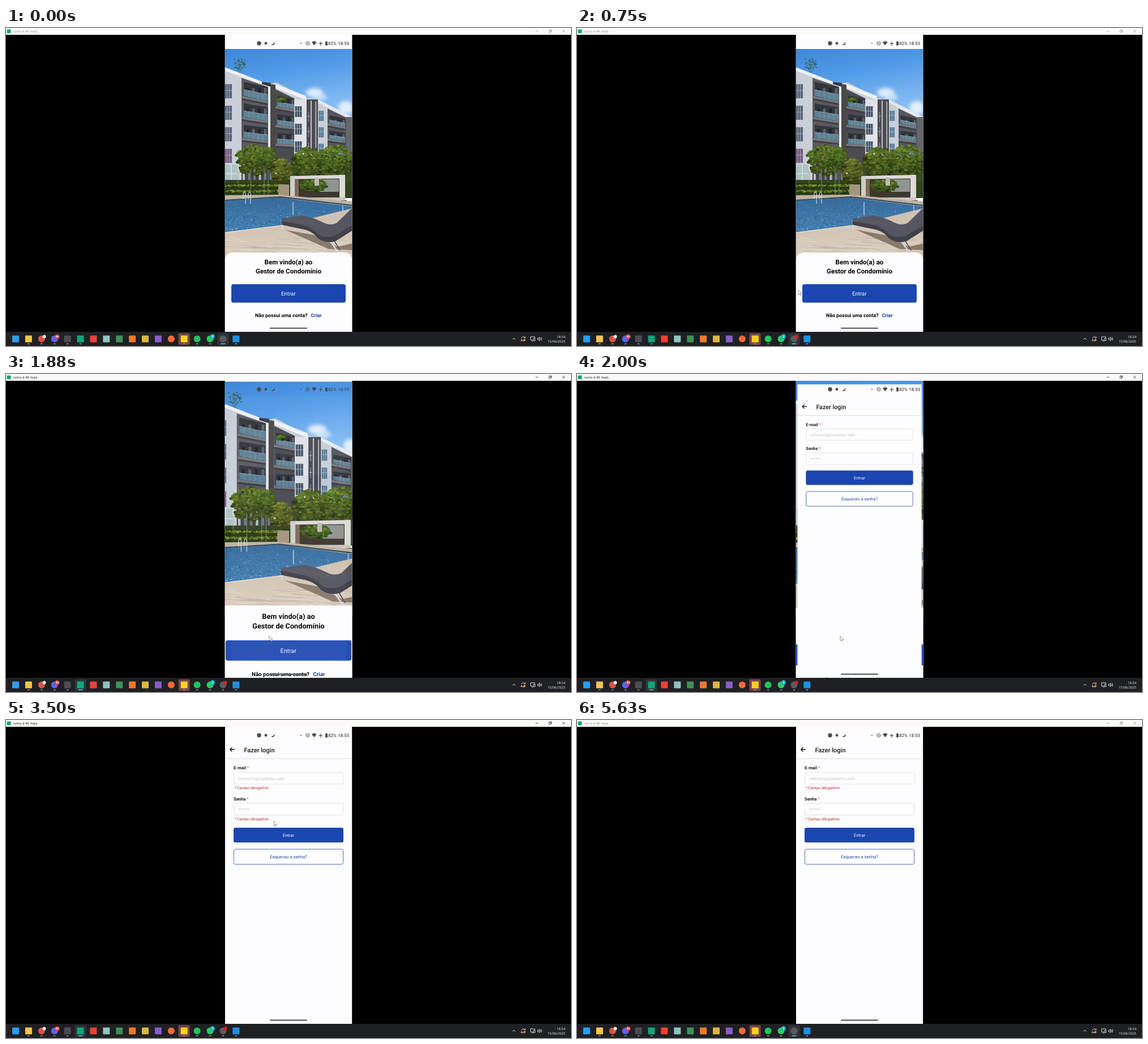
Recreate the animation shown at these times as an HTML page. Size 998 by 561 pixels, loop 5.76 s.

```html
<!DOCTYPE html>
<html lang="pt-BR">
<head>
<meta charset="utf-8">
<title>Gestor de Condomínio</title>
<style>
  html, body { margin: 0; width: 100%; height: 100%; overflow: hidden; background: #000; }
  svg { display: block; width: 998px; height: 561px; }
  text { font-family: Roboto, sans-serif; text-rendering: geometricPrecision; white-space: pre; }
  .mid { text-anchor: middle; }
  .b { font-weight: 700; }
  .m { font-weight: 500; }
  .sys { font-family: "Open Sans", sans-serif; }
  .field { fill: #fdfdff; stroke: #dcdce6; stroke-width: .8; }
  .hint { font-size: 7.65px; fill: #c9c9cf; }
  .err { font-size: 6.67px; fill: #b3261e; }
  .label { font-size: 7.6px; font-weight: 700; fill: #1c1c22; }
  .label tspan { fill: #d8434a; font-weight: 400; }
</style>
</head>
<body>
<svg viewBox="0 0 998 561">
  <defs>
    <clipPath id="screen"><rect x="386.7" y="12" width="224.7" height="524"/></clipPath>
    <clipPath id="photoBox"><rect x="386.7" y="37" width="224.7" height="374"/></clipPath>
    <linearGradient id="sky" x1="0" y1="0" x2=".15" y2="1">
      <stop offset="0" stop-color="#3f86d8"/><stop offset=".22" stop-color="#529be8"/><stop offset=".5" stop-color="#86bdf3"/>
    </linearGradient>
    <linearGradient id="water" x1="0" y1="0" x2="0" y2="1">
      <stop offset="0" stop-color="#376a9b"/><stop offset="1" stop-color="#4585b8"/>
    </linearGradient>
    <linearGradient id="deck" x1="0" y1="0" x2="0" y2="1">
      <stop offset="0" stop-color="#cdbfb0"/><stop offset="1" stop-color="#dccfbf"/>
    </linearGradient>
    <filter id="soft" x="-60%" y="-60%" width="220%" height="220%"><feGaussianBlur stdDeviation="3"/></filter>
  </defs>
  <rect width="998" height="561"/>

  <g clip-path="url(#screen)">
    <g id="welcome">
      <rect x="386" y="12" width="226" height="524" fill="#fdfdff"/>
      <g id="photo" clip-path="url(#photoBox)"></g>
      <path d="M386.700 536V410a14 14 0 0 1 14-14H597.400a14 14 0 0 1 14 14V536Z" fill="#fdfdff"/>
      <text class="mid b" x="499" y="417.4" font-size="11.55">Bem vindo(a) ao</text>
      <text class="mid b" x="499" y="433" font-size="11.55">Gestor de Condomínio</text>
      <g id="enter">
        <rect x="398" y="452" width="202" height="32.6" rx="3.5" fill="#1b46b0"/>
        <text class="mid" x="498.8" y="471.8" font-size="9.75" fill="#f4f6ff">Entrar</text>
      </g>
      <text class="b" x="440" y="509.7" font-size="8.8">Não possui uma conta?</text>
      <text class="b" x="538.5" y="509.7" font-size="8.8" fill="#1f3f9e">Criar</text>
    </g>

    <g id="login">
      <rect x="386.7" y="12" width="224.7" height="524" fill="#fdfdff"/>
      <path d="M404 52H395.6M399.4 48.2L395.6 52L399.4 55.8" fill="none" stroke="#111" stroke-width="1.3"/>
      <text class="m" x="420.5" y="56.6" font-size="11" fill="#16161a">Fazer login</text>
      <rect x="386" y="67.6" width="226" height="1" fill="#d9d9de"/>
      <text class="label" x="402" y="87.2">E-mail <tspan>*</tspan></text>
      <rect class="field" x="402.4" y="92.4" width="193.4" height="20.6" rx="2.5"/>
      <text class="hint" x="410" y="105.5">memoria@caderno.web</text>
      <text class="err error" x="404" y="122.3">* Campo obrigatório</text>
      <g id="pass">
        <text class="label" x="402" y="130.9">Senha <tspan>*</tspan></text>
        <rect class="field" x="402.4" y="136" width="193.4" height="20.6" rx="2.5"/>
        <text class="hint" x="410" y="149.8">******</text>
        <text class="err error" x="404" y="166.2">* Campo obrigatório</text>
      </g>
      <g id="actions">
        <g id="submit">
          <rect x="402" y="167.8" width="194" height="26" rx="3.2" fill="#1b46b0"/>
          <text class="mid" x="499" y="183.8" font-size="7.65" fill="#f4f6ff">Entrar</text>
        </g>
        <rect x="402.4" y="205.6" width="193.2" height="26.6" rx="3.2" fill="#fdfdff" stroke="#3b5eb5" stroke-width=".9"/>
        <text class="mid" x="499" y="221.6" font-size="7.7" fill="#2349a8">Esqueceu a senha?</text>
      </g>
    </g>

    <g fill="#4c4c52">
      <circle cx="447" cy="27" r="3.7"/>
      <circle cx="459" cy="27" r="2.4"/>
      <path d="M473.8 24.4A3.4 3.4 0 1 1 468.4 28.7A4.6 4.6 0 0 0 473.8 24.4Z"/>
      <circle cx="521" cy="27" r="1"/>
      <circle cx="533" cy="27" r="3.2" fill="none" stroke="#4c4c52" stroke-width=".9"/>
      <rect x="531.2" y="26.5" width="3.6" height="1"/>
      <path d="M540 25.2Q544.3 21.4 548.6 25.2L544.3 30.6Z"/>
      <path d="M555.4 23.4h.9v2.5l3.1 1.9v.8l-3.1-.9v1.9l.9.7v.5l-1.35-.3-1.35.3v-.5l.9-.7v-1.9l-3.1.9v-.8l3.1-1.9Z"/>
      <path d="M564 24.2h1v-.9h2v.9h1v6.6h-4Z"/>
      <text class="m" x="569" y="29.9" font-size="7.85">82%</text>
      <text class="m" x="586.2" y="29.9" font-size="7.85">18:55</text>
      <rect x="466" y="528.6" width="66" height="2.2" rx="1.1" fill="#5c5c61"/>
    </g>
  </g>

  <rect width="998" height="12" fill="#fbfaf8"/>
  <rect x="1.6" y="2.6" width="7" height="6.6" rx="1" fill="#12a579"/>
  <g id="title">
    <text class="sys" x="12.2" y="8.2" font-size="5.9" fill="currentColor">rumo d 4K mais</text>
    <path d="M935.5 5.6h4.6M959 4.2h3.4v3.4h-3.4ZM960 4.2v-1h3.4v3.4h-1M982.6 3.2l4.8 4.8M987.4 3.2l-4.8 4.8" fill="none" stroke="currentColor" stroke-width=".7"/>
  </g>

  <rect y="536" width="998" height="25" fill="#1e2023"/>
  <g id="tasks"></g>
  <g fill="none" stroke="#e8e8ea" stroke-width=".9">
    <path d="M894.4 549.8L897.2 547L900 549.8"/>
    <path d="M910.4 547.6a3.5 3.5 0 0 1 6.4-1.2M917 549.2a3.5 3.5 0 0 1-6.4 1.2M917.2 544.4v2.2h-2.2M910 552.4v-2.2h2.2"/>
    <path d="M934 547v-2.2h-7.4v5.6h4M928.4 552.2h3M931.8 547.6h2.6v4h-2.6Z"/>
    <path d="M939 547.2h1.6l2-1.8v6.2l-2-1.8H939ZM944 547q1 1.4 0 3M945.4 545.6q2 2.9 0 5.8"/>
  </g>
  <circle cx="915.6" cy="550.6" r="2.1" fill="#f08a24"/>
  <g fill="#f2f2f2" font-size="5.9" text-anchor="end">
    <text class="sys" x="988" y="547">18:54</text>
    <text class="sys" x="988" y="555.2">15/06/2025</text>
  </g>

  <path id="cursor" d="M0 0V8.6L2 6.8L3.3 9.8L4.6 9.2L3.3 6.3H6Z" fill="#fff" stroke="#555" stroke-width=".55"/>
</svg>

<script>
const $ = id => document.getElementById(id);

function add(parent, tag, attrs) {
  const el = document.createElementNS("http://www.w3.org/2000/svg", tag);
  for (const k in attrs) el.setAttribute(k, attrs[k]);
  return parent.appendChild(el);
}

let seed = 11;
const rand = () => (seed = seed * 16807 % 2147483647) / 2147483647;

function drawPhoto() {
  const g = $("photo");
  const poly = (fill, points) => add(g, "polygon", { fill, points });
  const rect = (fill, x, y, width, height) => add(g, "rect", { fill, x, y, width, height });
  const line = (stroke, w, d) => add(g, "path", { d, stroke, "stroke-width": w, fill: "none" });
  const blob = (fill, cx, cy, rx, ry, extra) => add(g, "ellipse", { fill, cx, cy, rx, ry, ...extra });

  // dark leaves first, sunlit ones last and higher up
  function foliage(cx, cy, rx, ry, count, hue) {
    for (let i = 0; i < count; i++) {
      const a = rand() * 6.283, d = rand() ** .6, lit = i / count;
      const y = Math.sin(a) * d, r = 2.8 - lit * 1.6 + rand();
      const light = 11 + lit * 16 - y * 6 + rand() * 9;
      blob(`hsl(${hue + rand() * 14} 50% ${light}%)`, cx + Math.cos(a) * d * rx, cy + y * ry, r * 1.2, r * .8);
    }
  }
  function balcony(x, y, w, h, skew) {
    const band = (fill, top, bottom, out = 0) =>
      poly(fill, `${x - out},${y + top} ${x + w},${y + top + skew} ${x + w},${y + bottom + skew} ${x - out},${y + bottom}`);
    band("#33363c", 0, h);
    for (let i = 0; i < 4; i++) rect(i % 2 ? "#59636e" : "#20242b", x + w * (i + .4) / 4, y + skew + 2, w / 9, h * .55);
    band("#5d8296", h * .5, h - 3);
    for (let i = 1; i < 5; i++) line("#90abba", .5, `M${x + w * i / 5} ${y + h * .5 + skew * i / 5}v${h * .4}`);
    band("#aab9c1", h * .5 - .7, h * .5);
    band("#77787d", h - 3, h + 1, 3);
    band("#3f4045", h + 1, h + 4, 3);
  }
  function pane(x, y, w, h, fill) {
    rect(fill, x, y, w, h);
    line("#bfc7d0", .7, `M${x + w / 3} ${y}v${h}M${x + w * 2 / 3} ${y}v${h}M${x} ${y + h * .45}h${w}`);
  }

  rect("url(#sky)", 386, 37, 226, 260);
  const cloud = { filter: "url(#soft)" };
  blob("#f2f7fd", 545, 114, 15, 8, { ...cloud, opacity: .85 });
  blob("#dcebfb", 555, 122, 12, 6, { ...cloud, opacity: .8 });
  blob("#f2f7fd", 600, 141, 13, 12, { ...cloud, opacity: .85 });
  line("#3b5f52", .7, "M413 82L412 56M411 78L404 60M414 78L422 62M412 72L408 57M414 70L417 54");
  for (let i = 0; i < 45; i++) {
    blob("#345f49", 403 + rand() * 20, 54 + rand() * 20, .8 + rand(), .6 + rand() * .5, { opacity: .8 });
  }

  // facade
  poly("#c9ced7", "386,71 466,102 466,98 478,96 530,123 552,127 612,160 612,275 386,275");
  poly("#eff1f4", "386,69 466,100 466,105 386,75");
  poly("#eff1f4", "474,98 530,120 530,127 474,105");
  poly("#e6e9ed", "551,126 612,157 612,163 551,132");
  poly("#363940", "452,95 468,97 468,104 452,99");
  poly("#5a5b60", "416,88 463,104 463,275 416,275");
  poly("#4b4c52", "476,108 509,124 509,275 476,275");
  poly("#54565d", "568,142 601,158 601,275 568,275");
  rect("#dfe2e7", 509.5, 126, 21, 150);
  poly("#4a4848", "467,99 476,100 476,275 467,275");
  rect("#e9ebee", 463, 103, 3.6, 172);
  rect("#4b4b50", 531, 126, 20, 150);
  rect("#c1c5cb", 538, 128, 2, 146);
  rect("#c1c5cb", 546.500, 130, 1.6, 144);
  rect("#66676c", 601, 157, 11, 118);
  for (let i = 0; i < 4; i++) {
    pane(386, 99 + 38 * i, 13, 25, i < 3 ? "#59647a" : "#76587f");
    balcony(420, 95 + 38 * i, 42, 28 - i, 9 - 2 * i);
    if (i < 3) {
      balcony(479, 119 + 33 * i, 30, 22, 6 - 2 * i);
      pane(510.5, 138 + 31 * i, 12, 19, "#455469");
      pane(552.5, 146 + 29 * i, 8.5, 18, "#4a7594");
      pane(532, 148 + 27 * i, 5, 17, "#2d343f");
      balcony(571, 154 + 27 * i, 28, 17, 6 - 2 * i);
    }
  }
  foliage(487, 127, 7, 3, 16, 82);
  rect("#3f4345", 416, 238, 92, 38);
  for (let i = 0; i < 9; i++) rect(i % 3 ? "#6d787b" : "#b6bcba", 418 + i * 9.5, 240, 4, 30);
  rect("#adc4c2", 386, 239, 24, 36);
  line("#e3eae8", 1.2, "M386 240h24M398 240v34M410 240v34M386 257h24");

  // garden
  rect("#33421f", 386, 268, 226, 32);
  rect("#3a4a22", 505, 225, 107, 45);
  line("#4a3d2b", 1.6, "M444 274V236M488 274V248M540 266V236M577 266V236M436 230L444 250L456 230");
  foliage(438, 233, 34, 27, 330, 72);
  foliage(464, 227, 15, 17, 110, 76);
  foliage(487, 252, 18, 21, 170, 62);
  foliage(534, 238, 27, 28, 260, 72);
  foliage(583, 235, 32, 29, 330, 74);
  rect("#263a15", 386, 274, 114, 21);
  for (let i = 0; i < 260; i++) {
    const row = i % 2;
    blob(`hsl(${68 + rand() * 16} 52% ${20 + rand() * 24}%)`, 386 + rand() * 114, 276 + row * 10 + rand() * 3.500, 1.8, 1);
  }
  line("#8f9385", .8, "M432 250V292M456 248V294M463 250V294M410 252V274");

  // pavilion
  rect("#3d382e", 510, 264, 82, 38);
  rect("#7d6a57", 510, 267, 7, 34);
  rect("#8e9490", 554, 267, 34, 22);
  foliage(543, 278, 24, 10, 110, 78);
  poly("#dcdad7", "502,261 599,259 599,265.500 502,266.500");
  rect("#cfcdca", 502, 261, 8, 43);
  rect("#dddbd8", 589, 259, 10, 49);
  rect("#bcb9b5", 545, 264, 8, 14);
  rect("#c9c5c0", 516, 299, 83, 4.5);
  rect("#38302a", 552, 304, 50, 5);
  rect("#a5947d", 481, 276, 19, 23);

  // pool
  poly("#c0b3a3", "386,295 480,294 612,306 612,326 386,310");
  poly("url(#water)", "386,305 484,299 530,305 612,315 612,345 386,370");
  for (let i = 0; i < 900; i++) {
    const depth = rand(), tone = rand();
    blob(tone < .4 ? "#6ea6cf" : tone < .5 ? "#b5d3e8" : "#254f80",
      386 + rand() * 226, 304 + depth * 60, .6 + depth * 1.1, .3 + depth * .5, { opacity: .7 });
  }
  line("#8fb2cf", 2, "M507 307v23M595 313v12");
  line("#2c4559", 2, "M386 304L484 298L612 313");
  line("#dfe5e9", 1, "M419 302v-10q2-6 4 0v18M428 302v-10q2-6 4 0v18");

  // deck
  poly("url(#deck)", "386,361 485,349 612,318 612,411 386,411");
  for (let i = 0; i < 60; i++) {
    const x = 380 + rand() * 200, y = 366 + rand() * 44;
    line(rand() < .5 ? "#b9a795" : "#ebe1d4", .6, `M${x} ${y}l${20 + rand() * 50} ${2 + rand() * 3}`);
  }
  line("#e9dfd2", 1.5, "M386 361L487 348.500");

  // lounger
  poly("#8a7a6c", "493,356 548,366 585,386 612,380 612,392 570,390");
  line("#d9d9dc", 2.4, "M573 376L586 395M488 344v11");
  line("#4b4b57", 1.6, "M579 374L590 392");
  add(g, "path", { fill: "#565661", d: "M487 336L525 331Q545 335 558 342Q573 350 584 344L612 317V357L582 376Q566 381 551 371Q541 357 520 354L487 347Z" });
  add(g, "path", { fill: "#41414c", d: "M487 341L521 347Q541 351 552 364Q564 372 582 366L612 348V357L582 376Q566 381 551 371Q541 357 520 354L487 347Z" });
  for (let i = 0; i < 15; i++) line("#74747e", .5, `M${492 + i * 5} ${340 + i * .9}l9 -6`);
}

const tasks = [
  // colour, round, running
  ["#2a9df4", 0, 0], ["#f5c64b", 0, 1], ["#de5145", 1, 1], ["#5865f2", 1, 1], ["#4a4d52", 0, 1],
  ["#12a579", 0, 1], ["#ee4036", 0, 0], ["#8fc4bd", 0, 0], ["#3f8f58", 0, 0], ["#f47a28", 0, 0],
  ["#dcb642", 0, 0], ["#8a5cc9", 0, 0], ["#f76b3a", 1, 0], ["#fbd21e", 0, 1], ["#22c45e", 1, 1],
  ["#2bcb63", 1, 1], ["#5b5a61", 1, 1], ["#1f8fe0", 0, 1]
];
const taskX = i => 17 + i * 22.9;
const marks = [];

function drawTasks() {
  const g = $("tasks");
  add(g, "rect", { x: 304.5, y: 538.5, width: 20, height: 20.5, rx: 2, fill: "#7a4351" });
  tasks.forEach(([fill, round, running], i) => {
    const x = taskX(i);
    const tile = add(g, "rect", { x: x - 10, y: 538.5, width: 20, height: 20.5, rx: 2, fill: "#313438", opacity: 0 });
    if (round) add(g, "circle", { cx: x, cy: 548.5, r: 6, fill });
    else add(g, "rect", { x: x - 6, y: 542.5, width: 12, height: 12, rx: 1, fill });
    const bar = add(g, "rect", { y: 556.6, height: 1.4, rx: .7, opacity: running });
    marks.push({ x, tile, bar });
  });
  const badge = (x, y, r, fill, label, id) => {
    add(g, "circle", { cx: x, cy: y, r, fill, ...(id && { id }) });
    if (label) add(g, "text", { x, y: y + 1.8, class: "mid b", "font-size": 5, fill: "#fff" }).textContent = label;
  };
  badge(67.6, 544.6, 3, "#e9e9e9");
  badge(90.5, 544.6, 4.1, "#e5484d", "9+");
  badge(364.8, 544.2, 4.2, "#1db0c9", "2");
  badge(387.6, 544.2, 3, "#f01818", "", "rec");
}

const STEP = 125, LOOP = 5760, PHONE = 5, RECORDER = 16;

// step, x, y
const path = [
  [5, 362, 484], [6, 391, 462], [9, 455, 461], [10, 466, 462], [15, 465, 462], [16, 465, 462],
  [19, 462, 205], [21, 461, 187], [24, 461, 187], [27, 473, 178], [35, 473, 178],
  [40, 392, 534], [41, 384, 546], [43, 384, 546]
];
const zoomOut = { 15: 1.1, 16: 1.14, 17: 1.15 };
const zoomIn = { 15: .9, 16: .976, 17: .995 };
const fadeIn = { 15: .03 };
const press = { 14: .75, 15: .95 };
const pressSubmit = { 22: .75, 23: .93 };

function cursorAt(n) {
  const k = path.findIndex(p => p[0] >= n);
  if (k < 0 || n < path[0][0]) return null;
  if (path[k][0] === n) return path[k].slice(1);
  const [a, b] = [path[k - 1], path[k]], f = (n - a[0]) / (b[0] - a[0]);
  return [a[1] + (b[1] - a[1]) * f, a[2] + (b[2] - a[2]) * f];
}

const set = (id, name, value) => $(id).setAttribute(name, value);
const zoom = s => `translate(499 274) scale(${s}) translate(-499 -274)`;

function render(n) {
  const active = n >= 13 && n < 42, invalid = n >= 23;
  set("welcome", "transform", zoom(zoomOut[n] || 1));
  set("welcome", "display", n < 18 ? "inline" : "none");
  set("enter", "opacity", press[n] || 1);
  set("login", "display", n < 15 ? "none" : "inline");
  set("login", "transform", zoom(zoomIn[n] || 1));
  set("login", "opacity", fadeIn[n] || 1);
  set("submit", "opacity", pressSubmit[n] || 1);
  set("pass", "transform", `translate(0 ${invalid ? 11 : 0})`);
  set("actions", "transform", `translate(0 ${invalid ? 22.3 : 0})`);
  document.querySelectorAll(".error").forEach(e => e.setAttribute("display", invalid ? "inline" : "none"));

  set("title", "color", active ? "#151515" : "#8d8d8d");
  set("rec", "opacity", n >= 4 && n < 44 ? 1 : 0);
  marks.forEach(({ x, tile, bar }, i) => {
    const on = i === (active ? PHONE : RECORDER), w = on ? 8 : 4;
    tile.setAttribute("opacity", on ? 1 : 0);
    bar.setAttribute("x", x - w / 2);
    bar.setAttribute("width", w);
    bar.setAttribute("fill", on ? "#63c3f2" : "#9a9ca2");
  });

  const at = cursorAt(n);
  set("cursor", "display", at ? "inline" : "none");
  if (at) set("cursor", "transform", `translate(${at})`);
}

drawPhoto();
drawTasks();
let shown = -1;
function tick() {
  const n = Math.min(45, Math.floor(performance.now() % LOOP / STEP));
  if (n !== shown) render(shown = n);
  requestAnimationFrame(tick);
}
tick();
</script>
</body>
</html>
```
